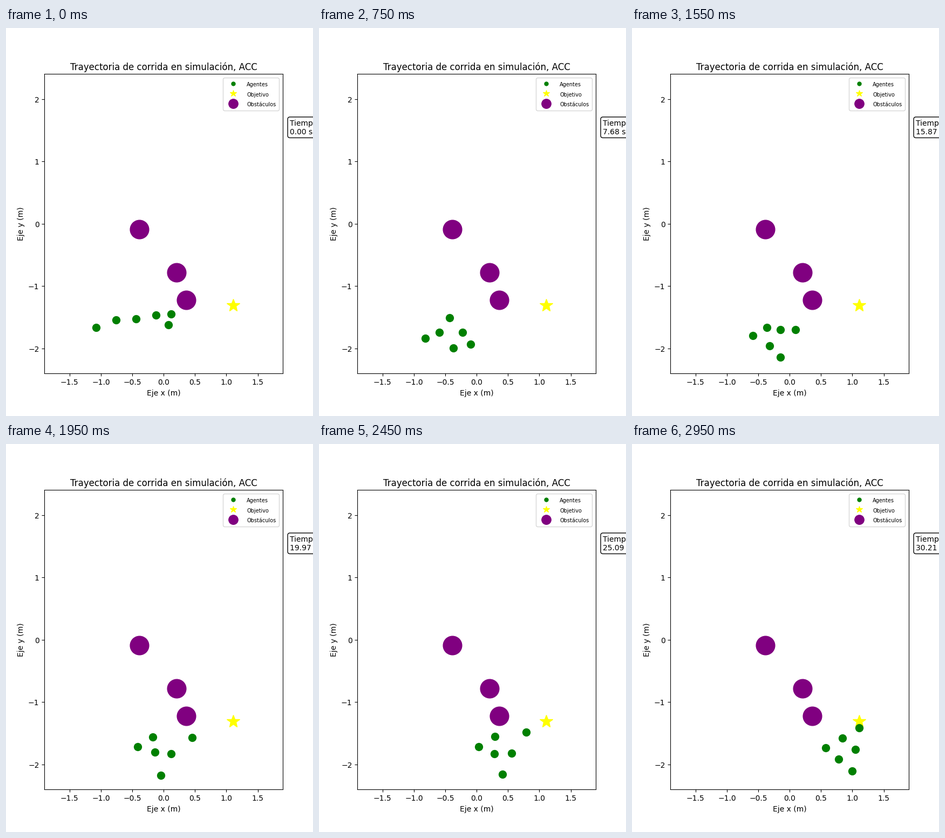
Write a matplotlib script that moves like this. It is 569 px wide and 719 px high and loops after 3000 ms.

```python
import numpy as np
import matplotlib.pyplot as plt
from matplotlib.animation import FuncAnimation

# The fraction of a pixel is cut off when the canvas is made
W, H, DPI = 569.49, 719.49, 100
FRAMES, INTERVAL = 60, 50
STEP = 0.512  # simulated seconds per frame


def triangle(corner, u, v):
    """Three rows of agents spanned by the edges u and v."""
    return [np.add(corner, i * np.array(u) + j * np.array(v))
            for i in range(3) for j in range(3 - i)]


# The agents start in a row, pass the obstacles and settle into a triangle
START = [(-1.08, -1.67), (-0.76, -1.545), (0.12, -1.45),
         (-0.12, -1.467), (-0.44, -1.527), (0.075, -1.62)]
GATHER = [(-0.70, -1.87), (-0.50, -1.77), (-0.23, -1.80),
          (-0.405, -2.11), (-0.36, -1.54), (-0.14, -2.05)]
ADVANCE = [(-0.415, -1.72), (-0.17, -1.56), (0.455, -1.57),
           (-0.14, -1.80), (0.12, -1.83), (-0.045, -2.18)]
FINISH = triangle((0.575, -1.735), (0.21, -0.186), (0.265, 0.16))

KEYS = np.array([0, 22, 39, FRAMES - 1])
PATH = np.array([START, GATHER, ADVANCE, FINISH])
SLOPE = np.gradient(PATH, KEYS, axis=0)

OBSTACLES = np.array([(-0.388, -0.090), (0.205, -0.783), (0.360, -1.224)])
GOAL = (1.109, -1.311)


def agents_at(i):
    """Smooth (cubic Hermite) position of every agent at frame i."""
    k = min(np.searchsorted(KEYS, i, side="right"), len(KEYS) - 1) - 1
    h = KEYS[k + 1] - KEYS[k]
    u = (i - KEYS[k]) / h
    return ((1 + 2 * u) * (1 - u) ** 2 * PATH[k]
            + u * u * (3 - 2 * u) * PATH[k + 1]
            + h * u * (1 - u) * ((1 - u) * SLOPE[k] - u * SLOPE[k + 1]))


def clock(i):
    return f"Tiempo:\n{i * STEP:.2f} s"


fig = plt.figure(figsize=(W / DPI, H / DPI), dpi=DPI)
ax = fig.add_axes([71.25 / W, 79.2 / H, 441.75 / W, 554.4 / H])
ax.set(xlim=(-1.9, 1.9), ylim=(-2.4, 2.4), xlabel="Eje x (m)",
       ylabel="Eje y (m)",
       title="Trayectoria de corrida en simulación, ACC")

agents, = ax.plot(*agents_at(0).T, "o", color="green", markersize=10,
                  zorder=3, label="Agentes")
ax.plot(*GOAL, "*", color="yellow", markersize=18, label="Objetivo")
ax.plot(*OBSTACLES.T, "o", color="purple", markersize=25, label="Obstáculos")

legend = ax.legend(loc="upper right", markerscale=0.5)
for label in legend.get_texts():
    label.set_fontsize(7)

timer = ax.text(1.03, 0.8, clock(0), transform=ax.transAxes,
                bbox=dict(boxstyle="round", facecolor="white"))


def update(i):
    agents.set_data(*agents_at(i).T)
    timer.set_text(clock(i))
    return agents, timer


anim = FuncAnimation(fig, update, frames=FRAMES, interval=INTERVAL,
                     repeat=True, repeat_delay=0)
plt.show()
```
